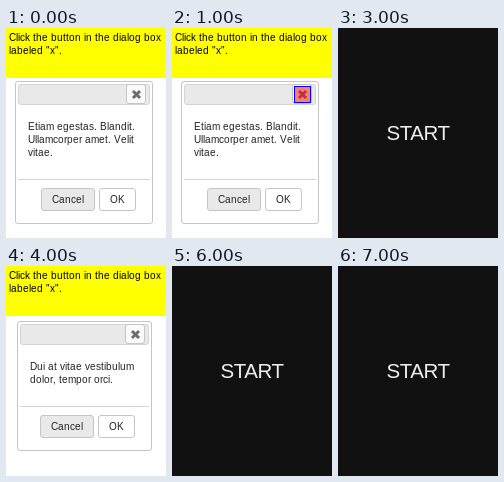
Write an HTML page that moves like this. It is 160 by 210 pixels and loops after 8000 ms.

```html
<!DOCTYPE html>
<html lang="en">
<head>
<meta charset="utf-8">
<title>Dialog task</title>
<style>
  html, body { margin: 0; width: 100%; height: 100%; overflow: hidden; background: #fff; }
  svg { display: block; width: 160px; height: 210px; }
  text { font-family: "Liberation Sans", Arial, sans-serif; }
  .start { font-size: 20.5px; letter-spacing: -.5px; text-anchor: middle; }
</style>
</head>
<body>
<svg id="stage" viewBox="0 0 160 210" xmlns="http://www.w3.org/2000/svg"></svg>
<script>
const NS = "http://www.w3.org/2000/svg";
const LOOP = 8000, ROUND = 4000, STEP = 1000;
const stage = document.getElementById("stage");
const pen = document.createElement("canvas").getContext("2d");
pen.font = '10px "Liberation Sans", Arial, sans-serif';

function add(parent, tag, attrs = {}) {
  const node = document.createElementNS(NS, tag);
  for (const key in attrs) node.setAttribute(key, attrs[key]);
  parent.appendChild(node);
  return node;
}

// Glyphs sit on whole pixels, as with hinted screen text.
function label(parent, str, x, y, fill) {
  const xs = [];
  for (const ch of str) {
    xs.push(x);
    x += Math.round(pen.measureText(ch).width);
  }
  add(parent, "text", { x: xs.join(" "), y, fill, "font-size": 10 }).textContent = str;
}

// Rectangle with a crisp one-pixel border inside its bounds.
function panel(parent, x, y, w, h, fill, stroke, rx = 0) {
  return add(parent, "rect", { x: x + .5, y: y + .5, width: w - 1, height: h - 1, rx, fill, stroke });
}

function button(parent, str, x, y, w, fill) {
  panel(parent, x, y, w, 23, fill, "#c5c5c5", 2.5);
  label(parent, str, x + 11, y + 15, "#222");
}

function dialog({ x, y, w, lines }) {
  const group = add(stage, "g");
  const right = x + w, foot = y + 59 + lines.length * 13;
  panel(group, x, y, w, foot + 45 - y, "#fff", "#c5c5c5", 2.5);
  panel(group, x + 3, y + 3, w - 6, 21, "#e9e9e9", "#d4d4d4", 2.5);
  panel(group, right - 27, y + 3, 20, 20, "#fafafa", "#c5c5c5", 2.5);
  add(group, "path", {
    d: `M${right - 20} ${y + 10}l7 7m0 -7l-7 7`,
    stroke: "#6c6c6c", "stroke-width": 3, fill: "none"
  });
  lines.forEach((line, i) => label(group, line, x + 13, y + 49 + i * 13, "#222"));
  add(group, "rect", { x: x + 3, y: foot, width: w - 6, height: 1, fill: "#d4d4d4" });
  button(group, "Cancel", right - 112, foot + 9, 54, "#e9e9e9");
  button(group, "OK", right - 54, foot + 9, 37, "#fff");
  const mark = panel(group, right - 25, y + 5, 17, 17, "rgba(255,0,0,.5)", "#00f");
  return { group, mark };
}

add(stage, "rect", { width: 160, height: 50, fill: "#ff0" });
label(stage, "Click the button in the dialog box", 3, 13, "#000");
label(stage, 'labeled "x".', 3, 26, "#000");

const dialogs = [
  { x: 9, y: 53, w: 138, lines: ["Etiam egestas. Blandit.", "Ullamcorper amet. Velit", "vitae."] },
  { x: 11, y: 55, w: 135, lines: ["Dui at vitae vestibulum", "dolor, tempor orci."] }
].map(dialog);

const cover = add(stage, "g");
add(cover, "rect", { width: 160, height: 210, fill: "#111" });
add(cover, "text", { class: "start", x: 80, y: 112, fill: "#eee" }).textContent = "START";
const corner = add(cover, "rect", { width: 1, height: 2, fill: "#00f" });

function show(node, on) {
  node.setAttribute("visibility", on ? "inherit" : "hidden");
}

function render(ms) {
  const t = ms % LOOP;
  const turn = Math.floor(t / ROUND), step = Math.floor(t % ROUND / STEP);
  dialogs.forEach(({ group, mark }, i) => {
    show(group, i === turn);
    show(mark, step === 1);
  });
  show(cover, step >= 2);
  show(corner, step === 3);
}

const begin = performance.now();
function tick() {
  render(performance.now() - begin);
  requestAnimationFrame(tick);
}
tick();
</script>
</body>
</html>
```
